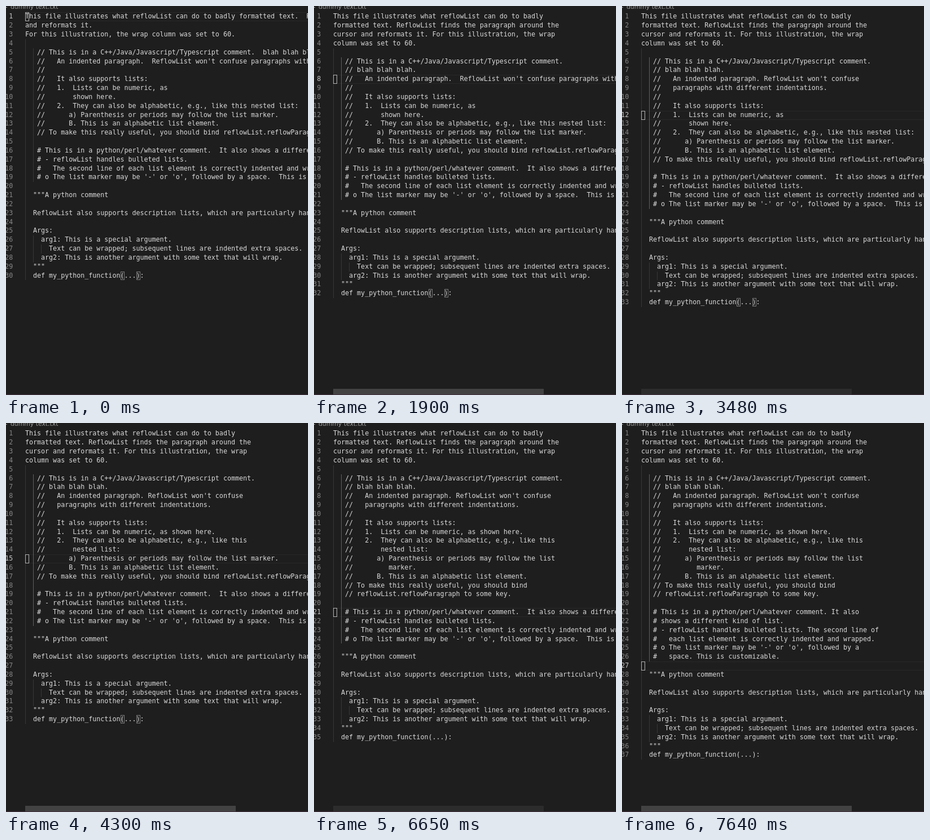
Animation of 535 by 690 pixels, one loop 8000 ms. Source, as an HTML page:

```html
<!DOCTYPE html>
<html lang="en">
<head>
<meta charset="utf-8">
<title>Reflow demo</title>
<style>
  html, body { margin: 0; width: 100%; height: 100%; overflow: hidden; background: #1e1e1e; }
  #stage {
    position: relative; width: 535px; height: 690px; overflow: hidden;
    font: 11.667px/15.833px "DejaVu Sans Mono", monospace; color: #dadada;
  }
  #stage div { position: absolute; box-sizing: border-box; white-space: pre; }
  #stage .crumb {
    left: 8px; top: -5px; color: #a0a0a0;
    font: 10.833px/14px "DejaVu Sans", sans-serif;
  }
  .icon { left: 0; top: 2px; width: 2px; height: 1px; background: #a0a0a0; }
  .text { left: 34px; }
  .num { left: -8px; width: 20.33px; text-align: right; color: #858585; }
  .num.on { color: #c6c6c6; }
  .row { left: 34px; width: 520px; height: 16px; border: 1px solid #282828; }
  .guide { width: 1px; background: #373737; }
  .guide.on { background: #606060; }
  .box { width: 7px; height: 15px; border: 1px solid #7c7c7c; }
  .caret { left: 34px; width: 7px; height: 16px; border: 1px solid #b4b5b3; }
  .bar { left: 34px; top: 679px; width: 373px; height: 10px; background: #424242; }
  .status { left: 0; top: 689px; width: 535px; height: 1px; background: #42303f; }
</style>
</head>
<body>
<div id="stage">
  <div class="crumb">dummy text.txt</div>
  <div class="icon"></div>
  <div id="page"></div>
  <div class="bar" id="bar"></div>
  <div class="status"></div>
</div>
<script>
const LOOP = 8000, LEFT = 34, TOP = 11, PITCH = 95 / 6, CHAR = 7.024;

const START = `This file illustrates what reflowList can do to badly formatted text.  ReflowList finds the paragraph around the cursor
and reformats it.
For this illustration, the wrap column was set to 60.

   // This is in a C++/Java/Javascript/Typescript comment.  blah blah blah.
   //   An indented paragraph.  ReflowList won't confuse paragraphs with different indentations.
   //
   //   It also supports lists:
   //   1.  Lists can be numeric, as
   //       shown here.
   //   2.  They can also be alphabetic, e.g., like this nested list:
   //      a) Parenthesis or periods may follow the list marker.
   //      B. This is an alphabetic list element.
   // To make this really useful, you should bind reflowList.reflowParagraph to some key.

   # This is in a python/perl/whatever comment.  It also shows a different kind of list.
   # - reflowList handles bulleted lists.
   #   The second line of each list element is correctly indented and wrapped.
   # o The list marker may be '-' or 'o', followed by a space.  This is customizable.

  """A python comment

  ReflowList also supports description lists, which are particularly handy here.

  Args:
    arg1: This is a special argument.
      Text can be wrapped; subsequent lines are indented extra spaces.
    arg2: This is another argument with some text that will wrap.
  """
  def my_python_function(...):`.split("\n");

// Each step: time plus the values it changes; edit = [first line, lines removed, new text].
const STEPS = [
  { at: 0, line: 1, caret: true, bar: 0, brackets: true },
  { at: 470, caret: false },
  { at: 780, line: 5, caret: true, bar: 0.38, edit: [1, 3,
`This file illustrates what reflowList can do to badly
formatted text. ReflowList finds the paragraph around the
cursor and reformats it. For this illustration, the wrap
column was set to 60.`] },
  { at: 830, bar: 1 },
  { at: 1130, caret: false, bar: 0.38 },
  { at: 1210, bar: 1 },
  { at: 1440, line: 6, caret: true },
  { at: 1900, line: 8, edit: [6, 1,
`   // This is in a C++/Java/Javascript/Typescript comment.
   // blah blah blah.`] },
  { at: 2400, line: 10, edit: [8, 1,
`   //   An indented paragraph. ReflowList won't confuse
   //   paragraphs with different indentations.`] },
  { at: 3020, line: 11 },
  { at: 3380, bar: 0.38 },
  { at: 3480, line: 12 },
  { at: 3910, line: 13, edit: [12, 2,
`   //   1.  Lists can be numeric, as shown here.`] },
  { at: 3950, bar: 1 },
  { at: 4300, line: 15, edit: [13, 1,
`   //   2.  They can also be alphabetic, e.g., like this
   //       nested list:`] },
  { at: 4820, line: 17, edit: [15, 1,
`   //      a) Parenthesis or periods may follow the list
   //         marker.`] },
  { at: 4880, brackets: false },
  { at: 5320, line: 18 },
  { at: 5710, bar: 0.38 },
  { at: 5810, line: 20, bar: 1, edit: [18, 1,
`   // To make this really useful, you should bind
   // reflowList.reflowParagraph to some key.`] },
  { at: 6240, line: 21 },
  { at: 6650, bar: 0.38 },
  { at: 6700, line: 23, bar: 1, edit: [21, 1,
`   # This is in a python/perl/whatever comment. It also
   # shows a different kind of list.`] },
  { at: 7170, line: 25, edit: [23, 2,
`   # - reflowList handles bulleted lists. The second line of
   #   each list element is correctly indented and wrapped.`] },
  { at: 7600, bar: 0.38 },
  { at: 7640, line: 27, bar: 1, edit: [25, 1,
`   # o The list marker may be '-' or 'o', followed by a
   #   space. This is customizable.`] }
];

const page = document.getElementById("page");
const bar = document.getElementById("bar");
// Rows snap up to whole pixels; the small offset absorbs float error.
const lineTop = i => Math.ceil(TOP + PITCH * i - 0.01);
const colLeft = c => Math.round(LEFT + CHAR * c);

function add(cls, style, text = "") {
  const el = document.createElement("div");
  el.className = cls;
  el.textContent = text;
  for (const key in style) el.style[key] = style[key] + "px";
  page.append(el);
}

function stateAt(index) {
  const state = { lines: START.slice() };
  for (const { edit, ...values } of STEPS.slice(0, index + 1)) {
    Object.assign(state, values);
    if (edit) state.lines.splice(edit[0] - 1, edit[1], ...edit[2].split("\n"));
  }
  return state;
}

// Indent depth of a line; blank lines follow their neighbours.
function depth(lines, i) {
  if (lines[i]) return Math.ceil(lines[i].search(/\S/) / 2);
  const above = depth(lines, i - 1), below = depth(lines, i + 1);
  return above < below ? above + 1 : below;
}

function drawGuides(lines, active) {
  const depths = lines.map((_, i) => depth(lines, i));
  const first = depths.findIndex(d => d > 1);
  const end = depths.findIndex((d, i) => i > first && d < 2);
  depths.forEach((d, i) => {
    const top = lineTop(i);
    for (let k = 0; k < d; k++) {
      const on = active && k === 1 && i >= first && i < end;
      add(on ? "guide on" : "guide",
        { left: colLeft(2 * k), top, height: lineTop(i + 1) - top });
    }
  });
}

function draw({ lines, line, caret, bar: opacity, brackets }) {
  page.replaceChildren();
  const rowTop = lineTop(line - 1);
  add("row", { top: rowTop });
  drawGuides(lines, line > 1);
  lines.forEach((text, i) => {
    const top = lineTop(i);
    add(i === line - 1 ? "num on" : "num", { top }, i + 1);
    add("text", { top }, text);
  });
  if (brackets) {
    const last = lines.length - 1;
    for (const mark of "()") {
      add("box", { left: colLeft(lines[last].indexOf(mark)), top: lineTop(last) });
    }
  }
  if (caret) add("caret", { top: rowTop });
  bar.style.opacity = opacity;
}

let shown = -1;
const begin = performance.now();
function tick() {
  const time = (performance.now() - begin) % LOOP;
  const index = STEPS.filter(step => step.at <= time).length - 1;
  if (index !== shown) draw(stateAt(shown = index));
  requestAnimationFrame(tick);
}
tick();
</script>
</body>
</html>
```
